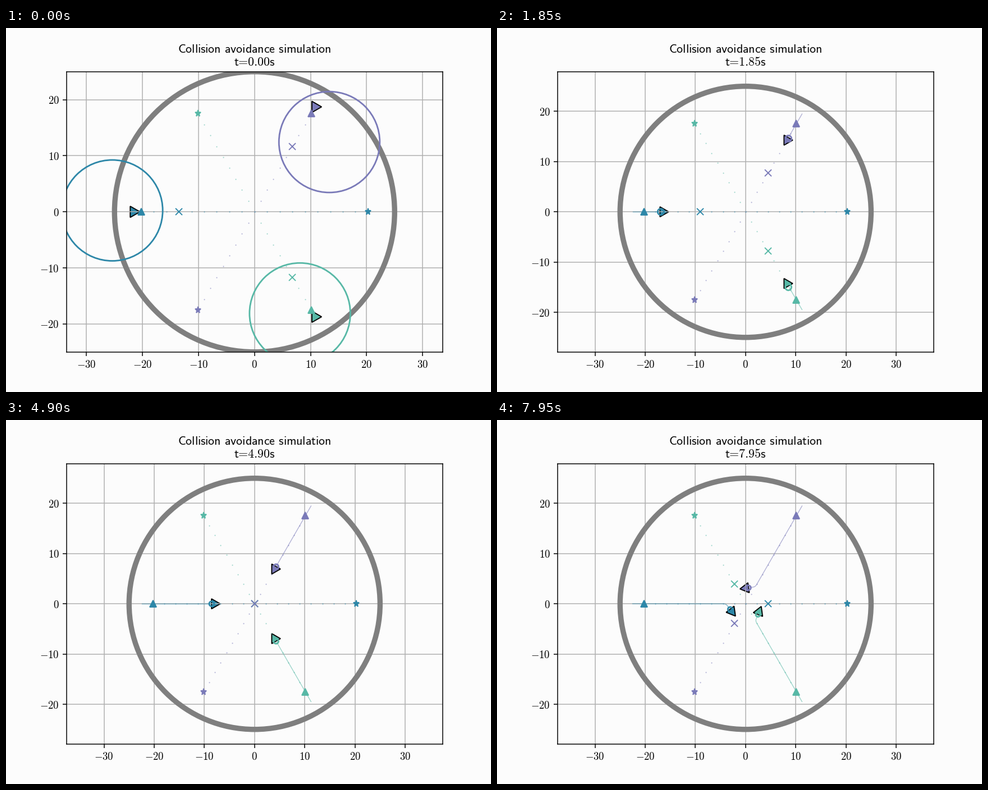
Recreate the animation shown at these times as a matplotlib script. Size 864 px wide and 648 px high, loop 8000 ms.

```python
import numpy as np
import matplotlib.pyplot as plt
from matplotlib.animation import FuncAnimation
from matplotlib.patches import Circle, Polygon

plt.rcParams["mathtext.fontset"] = "cm"

DT = 0.05
FRAMES = 160
SPEED = 2.78
START = -22.5
LOOKAHEAD = 6.7
PAPER = "#fcfcfc"
WAYPOINTS = np.linspace(-20.25, 20.25, 19)

# colour, direction of travel, first estimate error, later estimate error
AGENTS = [
    ("#2d87a8", 0, (-3.2, 0.25), (0.3, 0.0)),
    ("#57b8a6", 120, (-3.0, 1.1), (0.0, -0.4)),
    ("#7a7ab8", 240, (2.25, -6.78), (0.0, -0.3)),
]


def rotate(points, degrees):
    a = np.radians(degrees)
    c, s = np.cos(a), np.sin(a)
    return np.asarray(points, float) @ np.array([[c, s], [-s, c]])


def drive():
    """Path and heading of one agent travelling along +x, then swerving."""
    fine = 10
    t = (np.arange(FRAMES * fine) + 0.5) * DT / fine
    u = np.clip((t - 6.33) / 0.6, 0, 1)
    heading = np.radians(-52) * u * u * (3 - 2 * u)
    speed = SPEED + (0.88 - SPEED) * u
    step = np.column_stack([np.cos(heading), np.sin(heading)])
    step *= speed[:, None] * DT / fine
    path = np.array([-22.2, 0]) + np.cumsum(step, axis=0) - step[0]
    return path[::fine], np.degrees(heading[::fine])


def estimate(i, first, later):
    """Radius and centre error of the position estimate after i updates."""
    spread = 1 / (1 / 81 + i / 8.8)
    w = spread / 81
    drift = 2 * np.exp(-i * DT / 1.5)
    error = w * np.array(first) + (1 - w) * drift * np.array(later)
    return np.sqrt(spread + 0.38 ** 2 * (1 - w)), error


PATH, HEADING = drive()
BODY = np.array([(0, 1), (0, -1), (1.74, 0)])

fig = plt.figure(figsize=(6.4, 4.8), dpi=135, facecolor=PAPER)
ax = fig.add_axes([0.125, 0.11, 0.775, 0.77], facecolor=PAPER)
ax.grid(True)
ax.set_xticks(range(-30, 31, 10))
ax.set_yticks(range(-20, 21, 10))
ax.set_xticklabels([rf"$\mathrm{{{v}}}$" for v in range(-30, 31, 10)])
ax.set_yticklabels([rf"$\mathrm{{{v}}}$" for v in range(-20, 21, 10)])


def heading_line(y, size=11.65):
    return fig.text(0.5125, 1 - y / 648, "", fontsize=size,
                    ha="center", va="baseline")


GAP = r"\hspace{0.38}"
heading_line(43.5).set_text(
    rf"$\mathsf{{Collision{GAP}avoidance{GAP}simulation}}$")
clock = heading_line(67)

ax.add_patch(Circle((0, 0), 25, fill=False, ec="#7f7f7f", lw=5, zorder=1.6))


class Agent:
    def __init__(self, color, angle, first, later):
        self.angle, self.first, self.later = angle, first, later
        self.path = rotate(PATH, angle)
        self.begin = rotate([(START, 0)], angle)
        self.way = rotate(np.column_stack([WAYPOINTS, 0 * WAYPOINTS]), angle)

        def mark(points, **style):
            return ax.plot(*np.transpose(points), color=color, **style)[0]

        mark(self.way, ls="", marker="o", ms=1.1, mew=0, alpha=0.6)
        mark(self.way[:1], marker="^")
        mark(self.way[-1:], marker="*")
        self.goal = mark(self.way[:1], marker="x")
        self.trail = mark(self.begin, lw=0.7, alpha=0.6)
        self.body = ax.add_patch(
            Polygon(BODY, closed=True, fc=color, ec="black", lw=1, zorder=1))
        self.guess = ax.add_patch(
            Circle((0, 0), 1, fill=False, ec=color, lw=1.5, zorder=2.1))

    def update(self, i):
        pos = self.path[i]
        self.body.set_xy(pos + rotate(BODY, self.angle + HEADING[i]))
        radius, error = estimate(i, self.first, self.later)
        self.guess.set_radius(radius)
        self.guess.center = tuple(pos + error)
        k = np.searchsorted(WAYPOINTS, PATH[i, 0] + LOOKAHEAD)
        self.goal.set_data(*self.way[k:k + 1].T)
        line = np.vstack([self.begin, self.path[:i + 1]]) if i else self.begin
        self.trail.set_data(*line.T)


agents = [Agent(*spec) for spec in AGENTS]


def draw(i):
    half = 27.9 if i else 25
    wide = half * 669.6 / 498.96
    ax.set_xlim(-wide, wide)
    ax.set_ylim(-half, half)
    clock.set_text(
        rf"$\mathsf{{t\hspace{{-0.2}}=\hspace{{-0.2}}{i * DT:.2f}s}}$")
    for agent in agents:
        agent.update(i)
    return []


anim = FuncAnimation(fig, draw, frames=FRAMES, interval=50,
                     init_func=lambda: draw(0), repeat=True, repeat_delay=0)
plt.show()
```
